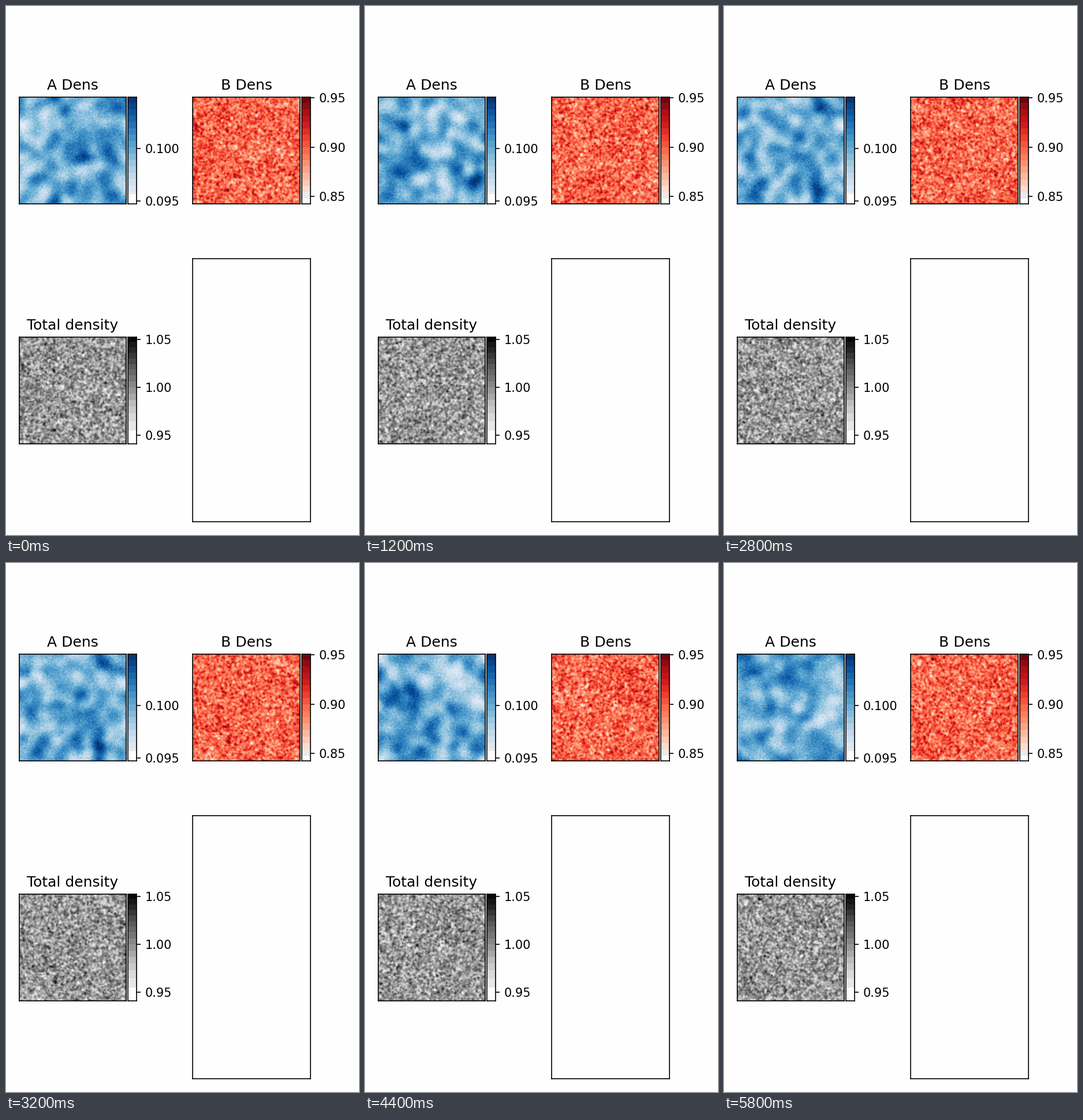
Write a matplotlib script that moves like this. It is 611 by 917 pixels and loops after 6000 ms.

```python
import numpy as np
import matplotlib.pyplot as plt
from matplotlib.animation import FuncAnimation

W, H, DPI = 611, 917, 150
FRAMES, STEP_MS = 30, 200
N = 100         # lattice cells per side
SPAN = 5        # frames in which the slow pattern renews itself
PAPER = "#fefefe"

# layout in pixels: margin, column width, square side, gap, bar width
LEFT, COL, SIDE, GAP = 22.5, 203.2, 185.4, 3
BAR = COL - SIDE - GAP
RIGHT = 323.4
TOP_Y, LOW_Y = 157.8, 573.6


def noise(seed, scale):
    """Unit-variance random field with a correlation length in cells."""
    f = np.fft.fftfreq(N)
    k2 = f[:, None] ** 2 + f[None, :] ** 2
    white = np.random.default_rng(seed).normal(size=(N, N))
    field = np.fft.ifft2(np.fft.fft2(white) * np.exp(-2 * (np.pi * scale) ** 2 * k2)).real
    return (field - field.mean()) / field.std()


def slow_field(i):
    """Blend successive random patterns while keeping their contrast."""
    k, u = divmod(i / SPAN, 1)
    u *= np.pi / 2
    return np.cos(u) * noise(50 + int(k), 4.5) + np.sin(u) * noise(51 + int(k), 4.5)


def densities(i):
    slow = 0.0014 * slow_field(i)
    a = 0.1 + slow + 0.0005 * noise(1000 + i, 0)
    b = 0.8968 - 2 * slow + 0.0148 * noise(2000 + i, 0.65)
    return a, b, a + b


fig = plt.figure(figsize=((W + 0.01) / DPI, (H + 0.01) / DPI), dpi=DPI, facecolor=PAPER)


def box(x, y, w, h):
    """Axes from a pixel rectangle, y counted from the top."""
    ax = fig.add_axes([x / W, 1 - (y + h) / H, w / W, h / H], facecolor=PAPER)
    ax.set(xticks=[], yticks=[])
    return ax


def bar(ax, cmap, lo, hi, ticks, fmt, base, pale, steps=15, bend=1.0):
    """Stepped colour scale: white base, one pale band, then the steps."""
    t = (np.arange(368) + 0.5) / 368
    edges = pale + (1 - pale) * np.linspace(0, 1, steps + 1) ** bend
    mids = (edges[:-1] + edges[1:]) / 2
    idx = np.clip(np.searchsorted(edges, t) - 1, 0, steps - 1)
    rgb = plt.get_cmap(cmap)(mids[idx])[:, :3]
    rgb[t < pale] = (0.94, 0.915, 0.905)
    rgb[t < base] = (0.996, 0.996, 0.996)
    ax.imshow(rgb[:, None], extent=(0, 1, lo, hi), origin="lower",
              aspect="auto", interpolation="nearest")
    ax.set(xticks=[], xlim=(0, 1), ylim=(lo, hi))
    ax.yaxis.tick_right()
    ax.set_yticks(ticks, [format(v, fmt) for v in ticks])


def panel(x, y, title, cmap, lo, hi, *scale, **opts):
    ax = box(x, y, SIDE, SIDE)
    img = ax.imshow(np.zeros((N, N)), cmap=cmap, vmin=lo, vmax=hi, aspect="auto")
    ax.set(xticks=[], yticks=[])
    ax.set_title(title, fontsize=12)
    bar(box(x + SIDE + GAP, y, BAR, SIDE), cmap, lo, hi, *scale, **opts)
    return img


images = [
    panel(LEFT, TOP_Y, "A Dens", "Blues", 0.09471, 0.1049,
          [0.095, 0.100], ".3f", 0.09, 0.115),
    panel(RIGHT, TOP_Y, "B Dens", "Reds", 0.8421, 0.9509,
          [0.85, 0.90, 0.95], ".2f", 0.05, 0.11),
    panel(LEFT, LOW_Y, "Total density", "Greys", 0.941, 1.0526,
          [0.95, 1.00, 1.05], ".2f", 0.125, 0.125, bend=0.85),
]
box(RIGHT, 438.2, COL, 456.3)


def update(i):
    for img, data in zip(images, densities(i)):
        img.set_data(data)
    return images


anim = FuncAnimation(fig, update, frames=FRAMES, interval=STEP_MS,
                     repeat=True, repeat_delay=0, blit=False)
plt.show()
```
